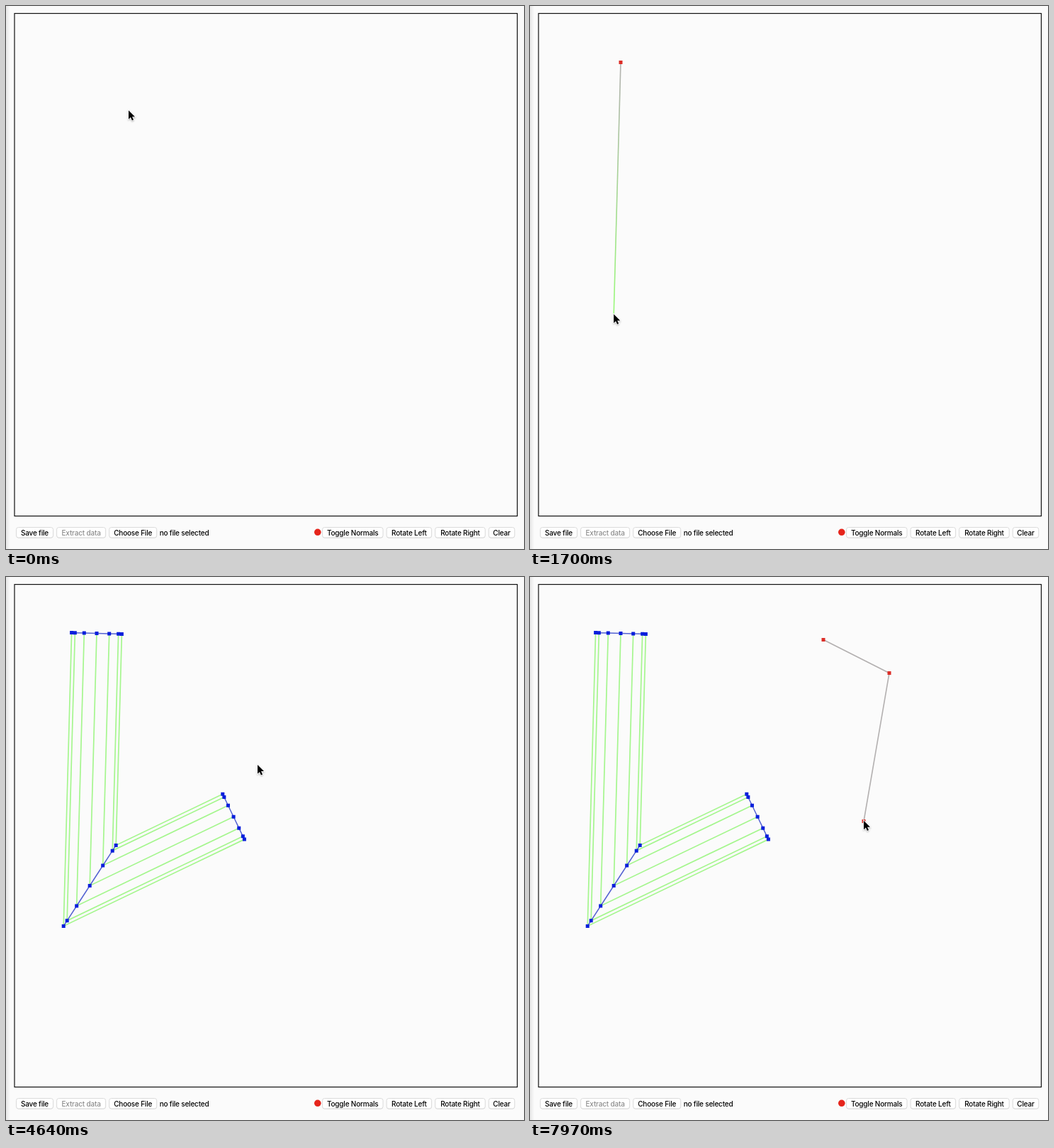
An HTML page for the animation above (8000 ms loop, 731 by 766 pixels).

```html
<!DOCTYPE html>
<html lang="en">
<head>
<meta charset="utf-8">
<title>Sweep editor</title>
<style>
  html, body { margin: 0; width: 100%; height: 100%; overflow: hidden; background: #fbfbfb; }
  svg { display: block; width: 100vw; height: 100vh; }
  text { font: 500 10px Inter, "Open Sans", sans-serif; letter-spacing: -.2px; }
</style>
</head>
<body>
<svg viewBox="0 0 731 766">
  <defs>
    <linearGradient id="edge">
      <stop stop-color="#e6e6e6"/><stop offset="1" stop-color="#fbfbfb"/>
    </linearGradient>
    <linearGradient id="fade" gradientUnits="userSpaceOnUse">
      <stop stop-color="#b3b0b0"/><stop offset="1" stop-color="#98fa78"/>
    </linearGradient>
    <filter id="blur" x="-50%" y="-50%" width="200%" height="200%">
      <feGaussianBlur stdDeviation=".9"/>
    </filter>
  </defs>
  <rect width="731" height="766" fill="#fbfbfb"/>
  <rect width="6" height="766" fill="url(#edge)"/>
  <rect x="12" y="10.5" width="709.5" height="709" fill="none" stroke="#111" stroke-width="1.2"/>
  <g id="bar"></g>
  <g id="tube"></g>
  <path id="preview" fill="none" stroke="url(#fade)" stroke-width="1.6"/>
  <path id="sketch" fill="none" stroke="#b3b0b0" stroke-width="1.6"/>
  <path id="dots" fill="#dc2d27"/>
  <g id="cursor">
    <path d="M0 1V13.5L2.9 10.8 4.9 15.3 7 14.4 5 10H9z" stroke="#000" stroke-width="1.4" opacity=".3" filter="url(#blur)"/>
    <path d="M0 0V12.5L2.9 9.8 4.9 14.3 7 13.4 5 9H9z" stroke="#fff" stroke-width="1.6" paint-order="stroke"/>
  </g>
</svg>
<script>
const LOOP = 8000, LAG = 45, TUBE_AT = 3330, RADIUS = 35.4, STROKE = 3;
const $ = id => document.getElementById(id);

// Pointer route; "rest" is the pause on either side of the time
const route = [
  { t: 0, x: 173, y: 148, rest: 100 },
  { t: 780, x: 128, y: 79.5, rest: 90, click: true },
  { t: 1130, x: 147, y: 275, rest: 50 },
  { t: 1740, x: 118.2, y: 435.5, rest: 90, click: true },
  { t: 2455, x: 265, y: 372.5 },
  { t: 2500, x: 274, y: 365.5 },
  { t: 2960, x: 321.1, y: 338.2, rest: 100, click: true },
  { t: 4640, x: 355, y: 266 },
  { t: 5640, x: 414, y: 88.5, rest: 150, click: true },
  { t: 6540, x: 507, y: 135.5, rest: 150, click: true },
  { t: 6910, x: 505, y: 144 },
  { t: 7820, x: 471, y: 344.5, rest: 120, click: true }
];
const clicks = route.filter(p => p.click);
const keys = route.flatMap(p =>
  p.rest ? [{ ...p, t: p.t - p.rest }, { ...p, t: p.t + p.rest }] : [p]);

const xy = p => [p.x, p.y];
const square = ([x, y]) => `M${x - 2.5} ${y - 2.5}h5v5h-5z`;
const poly = pts => pts.length ? 'M' + pts.map(p => p.join(' ')).join('L') : '';

function buttonRow(x, buttons) {
  return buttons.map(([label, w, ink = '#000']) => {
    const left = x;
    x += w + 5.1;
    return `
      <rect x="${left}" y="736" width="${w}" height="14.5" rx="3" fill="#bbb" opacity=".55"/>
      <rect x="${left}" y="735.5" width="${w}" height="14.5" rx="3" fill="#fff" stroke="#d4d4d4" stroke-width=".8"/>
      <text x="${left + w / 2}" y="746.6" text-anchor="middle" fill="${ink}">${label}</text>`;
  }).join('');
}

function buildBar() {
  $('bar').innerHTML =
    buttonRow(14.5, [['Save file', 52], ['Extract data', 69, '#8c8c8c'], ['Choose File', 67]]) +
    buttonRow(446.5, [['Toggle Normals', 85.5], ['Rotate Left', 63.5], ['Rotate Right', 70.5], ['Clear', 36.5]]) +
    `<text x="216.7" y="746.6">no file selected</text>
     <circle cx="439.8" cy="742.3" r="4.8" fill="#e6251c"/>`;
}

function normal(p, q) {
  const dx = q[0] - p[0], dy = q[1] - p[1], len = Math.hypot(dx, dy);
  return [dy / len, -dx / len];
}

// Sweep a circle along the spine, with mitred joints
function buildTube(spine) {
  const normals = spine.slice(1).map((q, i) => normal(spine[i], q));
  const rings = spine.map(([x, y], i) => {
    const a = normals[Math.max(0, i - 1)], b = normals[Math.min(i, normals.length - 1)];
    const scale = RADIUS / (1 + a[0] * b[0] + a[1] * b[1]);
    return Array.from({ length: 7 }, (_, k) => {
      const c = scale * Math.cos(k * Math.PI / 6);
      return [x + c * (a[0] + b[0]), y + c * (a[1] + b[1])];
    });
  });
  const sides = rings[0].map((_, k) => poly(rings.map(r => r[k]))).join('');
  $('tube').innerHTML = `
    <path d="${sides}" fill="none" stroke="#a5f68e" stroke-width="1.7"/>
    <path d="${rings.map(poly).join('')}" fill="none" stroke="#5462d2" stroke-width="1.5"/>
    <path d="${rings.flat().map(square).join('')}" fill="#0a1fdc"/>`;
}

// Tangent that vanishes at stops and turning points
function slope(i, axis) {
  if (i < 1 || i >= keys.length - 1) return 0;
  const rate = j => (keys[j + 1][axis] - keys[j][axis]) / (keys[j + 1].t - keys[j].t);
  const l = rate(i - 1), r = rate(i);
  return l * r > 0 ? 2 * l * r / (l + r) : 0;
}

function pointer(t) {
  let i = 0;
  while (i < keys.length - 2 && keys[i + 1].t <= t) i++;
  const p = keys[i], q = keys[i + 1], h = q.t - p.t;
  const u = Math.min(1, Math.max(0, (t - p.t) / h)), v = 1 - u;
  return ['x', 'y'].map(a =>
    p[a] * v * v * (1 + 2 * u) + q[a] * u * u * (3 - 2 * u) +
    h * u * v * (slope(i, a) * v - slope(i + 1, a) * u));
}

function draw(t) {
  const built = t >= TUBE_AT;
  const pts = clicks.filter(c => c.t <= t && c.t > TUBE_AT === built).map(xy);
  $('tube').style.display = built ? '' : 'none';
  $('sketch').setAttribute('d', poly(pts));
  $('dots').setAttribute('d', pts.map(square).join(''));

  const last = pts[pts.length - 1], end = pointer(t - LAG);
  const open = last && pts.length < STROKE && Math.hypot(end[0] - last[0], end[1] - last[1]) > 1;
  $('preview').setAttribute('d', open ? poly([last, end]) : '');
  if (open) {
    const ends = { x1: last[0], y1: last[1], x2: end[0], y2: end[1] };
    for (const k in ends) $('fade').setAttribute(k, ends[k]);
  }
  const [x, y] = pointer(t);
  $('cursor').setAttribute('transform', `translate(${x} ${y - .8})`);
}

buildBar();
buildTube(clicks.slice(0, STROKE).map(xy));
const start = performance.now();
function tick() {
  draw((performance.now() - start) % LOOP);
  requestAnimationFrame(tick);
}
tick();
</script>
</body>
</html>
```
